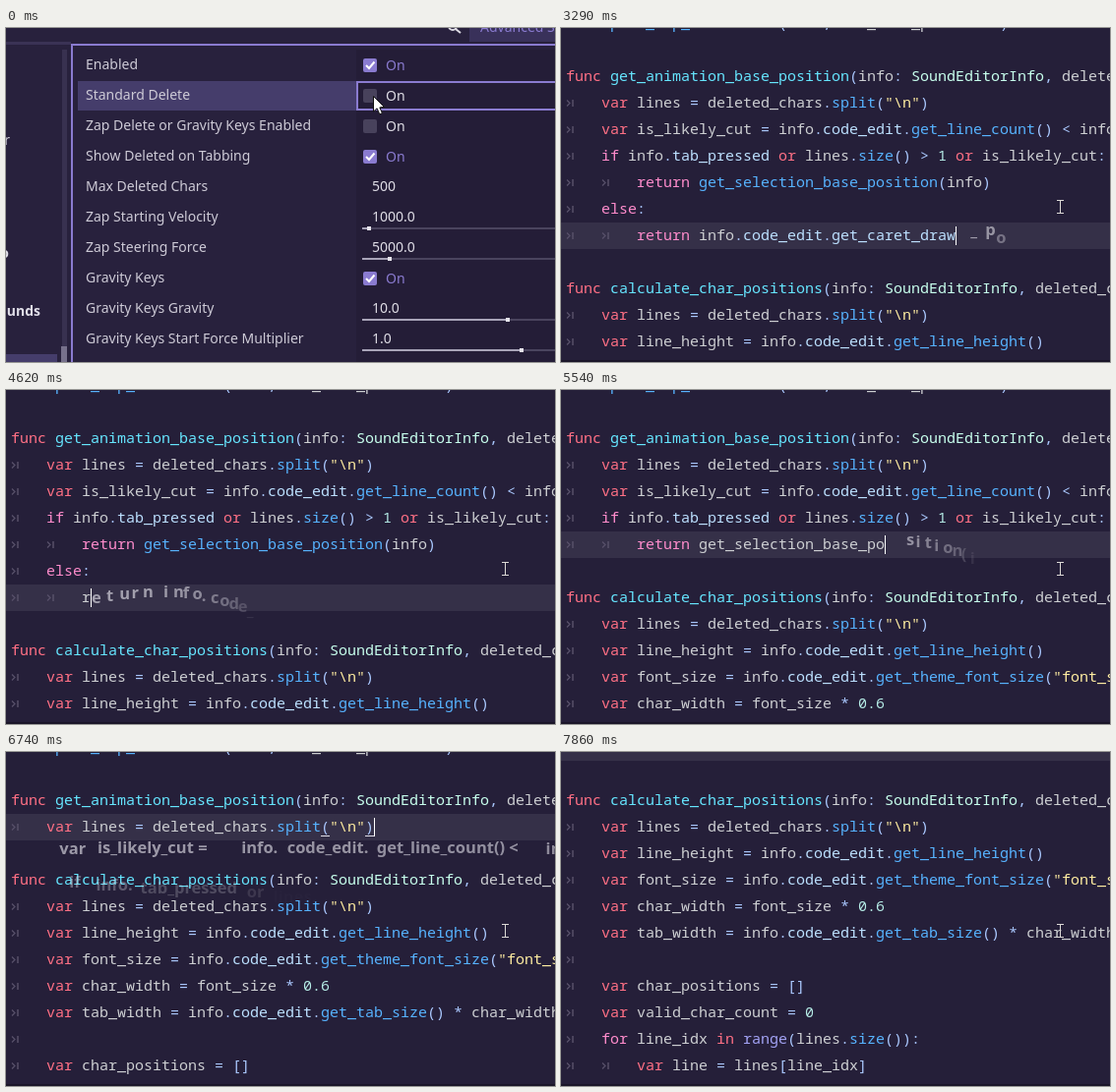
Recreate the animation shown at these times as an HTML page with a canvas. Size 558 by 340 pixels, loop 8.14 s.

```html
<!DOCTYPE html>
<html>
<head>
<meta charset="utf-8">
<style>
html, body { margin: 0; width: 100%; height: 100%; overflow: hidden; background: #251f39; }
canvas { display: block; }
</style>
</head>
<body>
<canvas id="stage" width="558" height="340"></canvas>
<script>
const ctx = document.getElementById('stage').getContext('2d');
const W = 558, H = 340, LOOP = 8140, EDITOR_START = 1640;
const UI = '"Noto Sans", sans-serif';
const MONO = '15px "Noto Sans Mono", "DejaVu Sans Mono", monospace';
const CELL = 9, LEFT = 5, LINE = 27, FIRST_TOP = -18;
const ACCENT = '#8a7bd0', PLAIN = '#cdcad6';

function rect(x, y, w, h, color) {
  ctx.fillStyle = color;
  ctx.fillRect(x, y, w, h);
}

function label(text, x, y, color, font = '14px ' + UI, align = 'left') {
  ctx.font = font;
  ctx.textAlign = align;
  ctx.fillStyle = color;
  ctx.fillText(text, x, y);
}

function stroke(points, color, width) {
  ctx.beginPath();
  points.forEach(([x, y]) => ctx.lineTo(x, y));
  ctx.strokeStyle = color;
  ctx.lineWidth = width;
  ctx.stroke();
}

// ---- Settings panel ----

const settings = [
  { name: 'Enabled', on: true },
  { name: 'Standard Delete', on: false },
  { name: 'Zap Delete or Gravity Keys Enabled', on: false },
  { name: 'Show Deleted on Tabbing', on: true },
  { name: 'Max Deleted Chars', value: '500' },
  { name: 'Zap Starting Velocity', value: '1000.0', knob: 369 },
  { name: 'Zap Steering Force', value: '5000.0', knob: 390 },
  { name: 'Gravity Keys', on: true },
  { name: 'Gravity Keys Gravity', value: '10.0', knob: 510 },
  { name: 'Gravity Keys Start Force Multiplier', value: '1.0', knob: 524 }
];

function checkbox(y, checked, lit) {
  ctx.beginPath();
  ctx.roundRect(363, y - 7, 14, 14, 2);
  ctx.fillStyle = checked ? ACCENT : '#48425c';
  ctx.fill();
  if (checked) stroke([[366, y], [369, y + 3], [374.5, y - 3.5]], '#fff', 2);
  label('On', 386, y + 5, lit ? ACCENT : '#dedce5');
}

function slider(y, knob) {
  rect(362, y - 1, W - 362, 2, '#4a445e');
  rect(362, y - 1, knob - 362, 2, '#a8a4b8');
  rect(knob - 2, y - 2, 4, 4, '#e6e4ec');
}

function arrowCursor(x, y) {
  const shape = [[0, 0], [0, 15.5], [3.6, 12.3], [6.3, 18.3], [8.9, 17.1], [6.3, 11.4], [11, 11]];
  ctx.beginPath();
  shape.forEach(([dx, dy]) => ctx.lineTo(x + dx, y + dy));
  ctx.closePath();
  ctx.fillStyle = '#fff';
  ctx.fill();
  ctx.strokeStyle = '#111';
  ctx.lineWidth = 1;
  ctx.stroke();
}

function drawSettings(t) {
  rect(0, 0, W, H, '#28213d');
  rect(0, 14, 66, 3, '#3a3255');
  rect(471, 0, W - 471, 14, '#39315a');
  label('Advanced Settings', 482, 4, ACCENT);
  ctx.beginPath();
  ctx.arc(454, -2, 4, 0, 7);
  ctx.strokeStyle = '#dedce5';
  ctx.lineWidth = 2;
  ctx.stroke();
  stroke([[457, 1], [462, 5]], '#dedce5', 2);

  label('r', 4, 119, PLAIN, '14px ' + UI, 'right');
  label('o', 3, 234, '#e0dee8', 'bold 14px ' + UI, 'right');
  label('Sounds', 35, 293, '#e0dee8', 'bold 14px ' + UI, 'right');
  rect(0, 332, 52, 8, '#453d6b');
  rect(57, 22, 5, H - 22, '#383150');
  rect(56, 324, 6, H - 324, '#77718c');

  rect(66, 16, W - 66, 2, ACCENT);
  rect(66, 16, 2, H - 16, ACCENT);
  rect(356, 22, W - 356, H - 22, '#241d37');
  rect(73, 54, 283, 30, '#453d6b');

  const checked = t >= 540 && t < 830 || t >= 1080;
  const lit = t >= 460 && t < 750 || t >= 1000;
  settings.forEach((row, i) => {
    const y = 37 + 31 * i;
    label(row.name, 81, y + 5, PLAIN);
    if (row.value) label(row.value, 372, y + 5, '#dedce5');
    else checkbox(y + 1, i === 1 ? checked : row.on, i === 1 ? lit : row.on);
    if (row.knob) slider(y + 12, row.knob);
  });
  ctx.strokeStyle = ACCENT;
  ctx.lineWidth = 2;
  ctx.strokeRect(357, 55, W - 355, 28);

  const slide = Math.min(1, Math.max(0, (t - 280) / 180));
  const nudge = t >= 130 ? 1 : 0;
  arrowCursor(373.5 + nudge - 2 * slide, 69.5 + nudge - 2 * slide);
}

// ---- Code editor ----

const source = String.raw`	spawn_zap_characters(info, del_char_positions)

func get_animation_base_position(info: SoundEditorInfo, deleted_chars: String, offset: int = 0) -> Vector2:
	var lines = deleted_chars.split("\n")
	var is_likely_cut = info.code_edit.get_line_count() < info.last_line_count
	if info.tab_pressed or lines.size() > 1 or is_likely_cut:
		return get_selection_base_position(info)
	else:
		return info.code_edit.get_caret_draw_pos()

func calculate_char_positions(info: SoundEditorInfo, deleted_chars: String) -> Array:
	var lines = deleted_chars.split("\n")
	var line_height = info.code_edit.get_line_height()
	var font_size = info.code_edit.get_theme_font_size("font_size")
	var char_width = font_size * 0.6
	var tab_width = info.code_edit.get_tab_size() * char_width
	
	var char_positions = []
	var valid_char_count = 0
	for line_idx in range(lines.size()):
		var line = lines[line_idx]
		var line_width = line.length()`.split('\n');
const CARET_ROW = 8;

// Backspace taps, then held backspace, then held Ctrl+Backspace.
const deletions = [1940, 2300, 2680, 2940, 3070, 3190].map(at => ({ at }));
for (let i = 0; i < 58; i++) deletions.push({ at: 3610 + 29.6 * i });
deletions.push({ at: 5650, word: true });
for (let i = 0; i < 46; i++) deletions.push({ at: 6060 + 30 * i, word: true });

const expand = text => text.replace(/\t/g, '    ');
const columnX = text => LEFT + CELL * expand(text).length;
const rowTop = row => FIRST_TOP + LINE * row;

function editorState(t) {
  const lines = source.slice(), flyers = [];
  let row = CARET_ROW;
  for (const { at, word } of deletions) {
    if (at > t) break;
    const line = lines[row];
    if (!line) {
      lines.splice(row--, 1);
      continue;
    }
    const cut = word ? line.match(/\w+\W*$|\s+$/)[0] : line.slice(-1);
    lines[row] = line.slice(0, line.length - cut.length);
    if (cut.trim()) flyers.push({ text: cut, x: columnX(lines[row]), y: rowTop(row) + 19, age: t - at });
  }
  return { lines, row, flyers };
}

function tokenColor(token, before, after) {
  if (token[0] === '"') return '#ffeda1';
  if (/^\d/.test(token)) return '#b5ece6';
  if (!/\w/.test(token)) return '#abc9ff';
  if (/^(func|var|or|in)$/.test(token)) return '#ff7085';
  if (/^(if|else|for|return)$/.test(token)) return '#ff8ccc';
  if (token === 'range') return '#a3a3f5';
  if (/^[A-Z]/.test(token)) return '#c7ffed';
  if (before.endsWith('func ')) return '#66e6ff';
  if (after[0] === '(') return '#57b3ff';
  return before.endsWith('.') ? '#bce0ff' : '#cdcfd2';
}

function drawLine(line, top) {
  const tabs = line.match(/^\t*/)[0].length;
  for (let i = 0; i < tabs; i++) {
    const x = LEFT + 36 * i, y = top + 13.5;
    stroke([[x + 1, y - 3], [x + 4, y], [x + 1, y + 3]], '#575069', 1.3);
    stroke([[x + 7, y - 3.5], [x + 7, y + 3.5]], '#575069', 1.5);
  }
  const text = expand(line);
  for (const { 0: token, index } of text.matchAll(/"[^"]*"?|\d+(\.\d+)?|\w+|[^\w\s"]/g)) {
    const color = tokenColor(token, text.slice(0, index), text.slice(index + token.length));
    label(token, LEFT + CELL * index, top + 18, color, MONO);
  }
}

// Deleted text is thrown to the right, slows down, falls and fades.
function drawFlyer({ text, x, y, age }) {
  const alpha = 0.63 * (1 - (age / 475) ** 3);
  if (alpha <= 0) return;
  const dx = 24 * (1 - Math.exp(-age / 100));
  const dy = 0.00024 * age * (age - 325);
  ctx.globalAlpha = alpha;
  label(text, x + dx, y + dy, '#e4e2ea', 'bold 16.5px ' + UI);
  ctx.globalAlpha = 1;
}

function drawEditor(t) {
  const { lines, row, flyers } = editorState(t);
  const top = rowTop(row), line = lines[row], caretX = columnX(line);
  rect(0, 0, W, H, '#251f39');
  rect(0, H - 2, W, 2, '#1b1629');
  rect(0, top, W, LINE, '#353048');
  lines.forEach((text, i) => drawLine(text, rowTop(i)));
  if (line.endsWith(')')) {
    rect(caretX - CELL, top + 22, CELL, 1, '#e0dee8');
    rect(columnX(line.slice(0, line.lastIndexOf('('))), top + 22, CELL, 1, '#e0dee8');
  }
  flyers.forEach(drawFlyer);
  if (t < 7860) rect(caretX, top + 4, 1, 19, '#fff');

  // I-beam pointer
  stroke([[504, 175.5], [511, 175.5]], '#dcd9d6', 1);
  stroke([[507.5, 175], [507.5, 189]], '#dcd9d6', 1);
  stroke([[504, 188.5], [511, 188.5]], '#dcd9d6', 1);
}

const start = performance.now();
function frame() {
  const t = (performance.now() - start) % LOOP;
  (t < EDITOR_START ? drawSettings : drawEditor)(t);
  requestAnimationFrame(frame);
}
frame();
</script>
</body>
</html>
```
